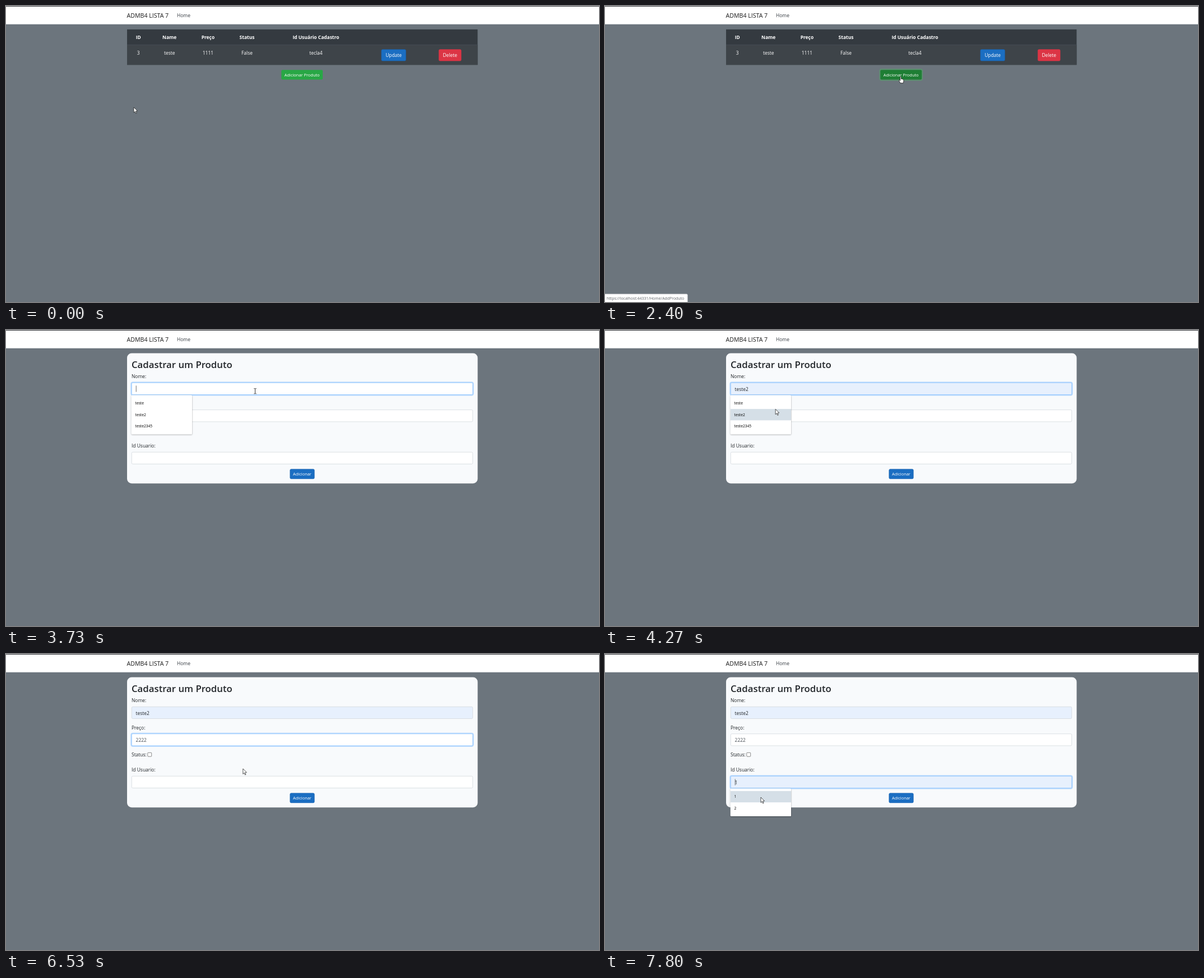
An HTML page for the animation above (8 s loop, 1058x529 px).

```html
<!DOCTYPE html>
<html lang="pt-BR">
<head>
<meta charset="utf-8">
<title>Cadastro de produtos</title>
<style>
html, body { margin: 0; width: 100%; height: 100%; overflow: hidden; background: #6c757d; }
svg { display: block; width: 100vw; height: 100vh; cursor: default; }
text { font: 8.45px "Open Sans", "Noto Sans", sans-serif; fill: #212529; white-space: pre; }
.mid { text-anchor: middle; }
.light { fill: #fff; }
.bold { font-weight: 700; }
.brand { font-size: 10.6px; fill: #1a1a1a; }
.title { font-size: 16.75px; font-weight: 600; }
.small { font-size: 7.45px; }
.item { font-size: 6.65px; fill: #000; }
.url { font-size: 6.95px; fill: #5f6368; }
</style>
</head>
<body>
<svg id="stage" viewBox="0 0 1058 529" xmlns="http://www.w3.org/2000/svg">
  <defs>
    <filter id="shade" x="-10%" y="-20%" width="120%" height="150%">
      <feDropShadow dx="0" dy="0.8" stdDeviation="0.9" flood-color="#000" flood-opacity="0.4"/>
    </filter>
  </defs>
  <rect width="1058" height="529" fill="#6c757d"/>
  <rect width="1058" height="32.5" fill="#fff"/>
  <rect y="32" width="1058" height="0.6" fill="#dee2e6"/>
  <rect width="1058" height="1" fill="#35363a"/>
  <text class="brand" x="215.6" y="20.6">ADMB4 LISTA 7</text>
  <text x="305" y="19.8" style="fill:#343a40">Home</text>
  <g id="listPage"></g>
  <g id="formPage"></g>
  <g id="status">
    <path d="M-1 514.8H145.5Q147.3 514.8 147.3 516.6V530H-1Z" fill="#fff" stroke="#c4c7ca" stroke-width="0.6"/>
    <text class="url" x="3" y="524.8">https://localhost:44331/Home/AddProduto</text>
  </g>
  <g id="pointer">
    <path id="arrow" d="M0 0V9.5L2.2 7.5L3.7 11L5.2 10.4L3.7 6.9L6.6 6.7Z" fill="#fff" stroke="#111" stroke-width="0.7" stroke-linejoin="round"/>
    <path id="hand" d="M-0.9 0.6Q0 -0.7 0.9 0.6V4.4Q1.9 3.7 2.5 4.7Q3.5 4.1 4 5.1Q5.3 4.8 5.3 6.2V8.6Q5.3 10 4.5 11.8H-0.6Q-1.4 10 -3.1 7.6Q-3.3 6.2 -2 6.5L-0.9 7.6Z" fill="#fff" stroke="#111" stroke-width="0.75" stroke-linejoin="round"/>
    <path id="beam" d="M-2.2 -4.6H-0.6L0 -4.1L0.6 -4.6H2.2M0 -4.1V4.1M-2.2 4.6H-0.6L0 4.1L0.6 4.6H2.2" fill="none" stroke="#222" stroke-width="0.9"/>
  </g>
</svg>
<script>
const $ = id => document.getElementById(id);
const clamp = v => Math.max(0, Math.min(1, v));
const ramp = (t, from, len = 134) => clamp((t - from) / len);
const show = (el, on) => el.setAttribute('display', on ? 'inline' : 'none');
const set = (el, attrs) => { for (const k in attrs) el.setAttribute(k, attrs[k]); };

const LOOP = 8000, STEP = 1000 / 15;
const FORM_AT = 2466, LEFT = 224.3, WIDTH = 608.4, FIELD_H = 21.2, ROW = 20.25, PAD = 4.5;

function make(tag, parent, attrs, label) {
  const el = document.createElementNS('http://www.w3.org/2000/svg', tag);
  set(el, attrs);
  if (label) el.textContent = label;
  parent.appendChild(el);
  return el;
}
const rect = (parent, x, y, width, height, fill, more) =>
  make('rect', parent, { x, y, width, height, fill, ...more });
const text = (parent, x, y, label, cls = '') =>
  make('text', parent, { x, y, class: cls }, label);

function button(parent, x, y, w, h, label, fill, edge, cls) {
  const box = rect(parent, x, y, w, h, fill, { rx: 2, stroke: edge, 'stroke-width': 0.6 });
  text(parent, x + w / 2, y + h / 2 + (cls ? 2.7 : 3.2), label, 'mid light ' + (cls || ''));
  return box;
}

// Product table
const listPage = $('listPage');
rect(listPage, 216, 41.8, 625.4, 63.4, '#343a40');
rect(listPage, 216, 69.4, 625.4, 35.8, '#3e4449');
rect(listPage, 216, 68.9, 625.4, 0.9, '#454d55');
[
  [236.2, 'ID', '3'], [291.7, 'Name', 'teste'], [360.4, 'Preço', '1111'],
  [430, 'Status', 'False'], [552.9, 'Id Usuário Cadastro', 'tecla4']
].forEach(([x, head, cell]) => {
  text(listPage, x, 59.2, head, 'mid bold light');
  text(listPage, x, 87.3, cell, 'mid light');
});
button(listPage, 669.8, 77.7, 43.6, 20.4, 'Update', '#1b6ec2', '#1861ac');
button(listPage, 772.3, 77.7, 39.8, 20.4, 'Delete', '#dc3545', '#dc3545');
const addRing = rect(listPage, 490.4, 113.2, 75.6, 19.4, 'none',
  { rx: 2.6, stroke: '#48b461', 'stroke-width': 1.76 });
const addBox = button(listPage, 491.3, 114.2, 73.8, 17.4, 'Adicionar Produto', '#28a745', 'none', 'small');

// Product form
const formPage = $('formPage');
rect(formPage, 216, 41.6, 625.5, 232.6, '#f8fafc', { rx: 8.2 });
text(formPage, 224, 68, 'Cadastrar um Produto', 'title');
[[86.2, 'Nome:'], [134.6, 'Preço:'], [183, 'Status:'], [210.3, 'Id Usuario:']]
  .forEach(([y, label]) => text(formPage, 224, y, label));
rect(formPage, 252.8, 176.3, 6.9, 6.9, '#fff', { rx: 0.8, stroke: '#6b6b6b', 'stroke-width': 0.8 });

const PRICE_KEYS = [5533, 5667, 5800, 5933];
const typed = t => '2'.repeat(PRICE_KEYS.filter(k => t >= k).length);

const fields = [
  { y: 94.3, on: 3267, off: 4933, open: 3400, close: 4600, auto: true,
    items: () => ['teste', 'teste2', 'teste2345'], value: t => t >= 4600 ? 'teste2' : '' },
  { y: 142.7, on: 4933, off: 6600, open: 5000, close: 6067, keys: PRICE_KEYS,
    items: t => ['1111', '2222', '2222234'].filter(s => s.startsWith(typed(t))), value: typed },
  { y: 218.3, on: 7333, off: LOOP, open: 7400, close: LOOP, auto: true,
    items: () => ['1', '2'], value: () => '' }
];
for (const f of fields) {
  f.ring = rect(formPage, LEFT - 1, f.y - 1, WIDTH + 2, FIELD_H + 2, 'none',
    { rx: 2.8, stroke: '#007bff', 'stroke-width': 1.8 });
  f.box = rect(formPage, LEFT, f.y, WIDTH, FIELD_H, '#fff', { rx: 2, 'stroke-width': 0.7 });
  f.text = text(formPage, 231.6, f.y + 14.3, '');
  f.caret = rect(formPage, 231.8, f.y + 5.1, 0.7, 11.2, '#333');
}
button(formPage, 506.8, 248.7, 43.4, 17.2, 'Adicionar', '#1b6ec2', '#1861ac', 'small');

// Suggestion list, shared by all fields
const menu = make('g', formPage, {});
const menuBox = rect(menu, 223.8, 0, 108.2, 0, '#fff', { rx: 1.5, filter: 'url(#shade)' });
const menuMark = rect(menu, 223.8, 0, 108.2, ROW, '#d5dfe7');
const menuItems = [0, 1, 2].map(() => text(menu, 230.6, 0, '', 'item'));

// Pointer moves: start, end, then four Bézier points
const moves = [
  [0, 867, 228, 181, 300, 10, 450, 20, 527.5, 126],
  [2867, 3267, 527.5, 126, 500, 122, 470, 112, 444.5, 109.2],
  [3733, 4467, 444.5, 109.2, 400, 112, 320, 140, 278, 147],
  [4600, 4867, 278, 147, 278, 150, 279, 154, 278.8, 157.6],
  [6067, 6333, 278.8, 157.6, 300, 165, 350, 185, 382, 196],
  [6333, 6533, 382, 196, 395, 200, 410, 204, 422.8, 205],
  [6600, 7200, 422.8, 205, 390, 262, 320, 252, 280, 232],
  [7600, 7800, 280, 232, 280, 240, 278, 250, 278, 256]
];
function pointerAt(t) {
  const m = moves.filter(v => t >= v[0]).pop();
  const u = ramp(t, m[0], m[1] - m[0]), s = u * u * (3 - 2 * u), r = 1 - s;
  const curve = i => r * r * r * m[i] + 3 * r * r * s * m[i + 2] + 3 * r * s * s * m[i + 4] + s * s * s * m[i + 6];
  return [curve(2), curve(3)];
}

const mix = (a, b, k) => 'rgb(' + a.map((v, i) => Math.round(v + (b[i] - v) * k)) + ')';

function drawMenu(t, x, y) {
  const f = fields.find(v => t >= v.open && t < v.close);
  show(menu, !!f);
  if (!f) return null;
  const items = f.items(t), top = f.y + FIELD_H + 0.9, height = items.length * ROW + 2 * PAD;
  const inside = x > 223 && x < 332 && y > top && y < top + height;
  const row = Math.floor((y - top - PAD) / ROW);
  const marked = inside && row >= 0 && row < items.length;
  set(menuBox, { y: top, height });
  set(menuMark, { y: top + PAD + row * ROW });
  show(menuMark, marked);
  menuItems.forEach((el, i) => {
    el.textContent = items[i] || '';
    set(el, { y: top + PAD + i * ROW + 12.4 });
  });
  return { f, inside, preview: marked ? items[row] : '' };
}

function drawField(f, t, hint) {
  const glow = ramp(t, f.on) - ramp(t, f.off);
  const value = f.value(t), preview = hint && hint.f === f ? hint.preview : '';
  const filled = f.auto && (value || preview);
  set(f.ring, { 'stroke-opacity': 0.27 * glow });
  set(f.box, {
    fill: filled ? '#e7f0fd' : '#fff',
    stroke: mix([206, 212, 218], [128, 189, 255], glow)
  });
  f.text.textContent = preview || value;
  f.text.style.fill = filled ? '#212529' : '#495057';
  const last = (f.keys || []).filter(k => t >= k).pop() || f.on + 67;
  const lit = t >= f.on && t < f.off && (t < last || (t - last) % 1060 < 530);
  show(f.caret, lit);
  if (lit) set(f.caret, { x: 231.8 + (value ? f.text.getComputedTextLength() : 0) });
}

function draw(ms) {
  const t = Math.floor((ms % LOOP + 4) / STEP) * STEP + 1;
  const onForm = t >= FORM_AT;
  const [x, y] = pointerAt(t);
  show(listPage, !onForm);
  show(formPage, onForm);

  const hover = ramp(t, 720), press = ramp(t, 2265);
  set(addBox, { fill: press ? mix([33, 136, 56], [30, 126, 52], press) : mix([40, 167, 69], [33, 136, 56], hover) });
  set(addRing, { 'stroke-opacity': 0.5 * press });
  set($('status'), { opacity: ramp(t, 733, 120) * (1 - ramp(t, 2440, 134)) });

  const hint = onForm ? drawMenu(t, x, y) : null;
  if (onForm) fields.forEach(f => drawField(f, t, hint));

  const overField = onForm && !(hint && hint.inside) &&
    fields.some(f => y > f.y && y < f.y + FIELD_H);
  const shape = t >= 733 && t < 2595 ? 'hand' : overField ? 'beam' : 'arrow';
  ['arrow', 'hand', 'beam'].forEach(id => show($(id), id === shape));
  set($('pointer'), { transform: `translate(${x.toFixed(2)} ${y.toFixed(2)})` });
}

const start = performance.now();
function tick() {
  draw(performance.now() - start);
  requestAnimationFrame(tick);
}
tick();
</script>
</body>
</html>
```
